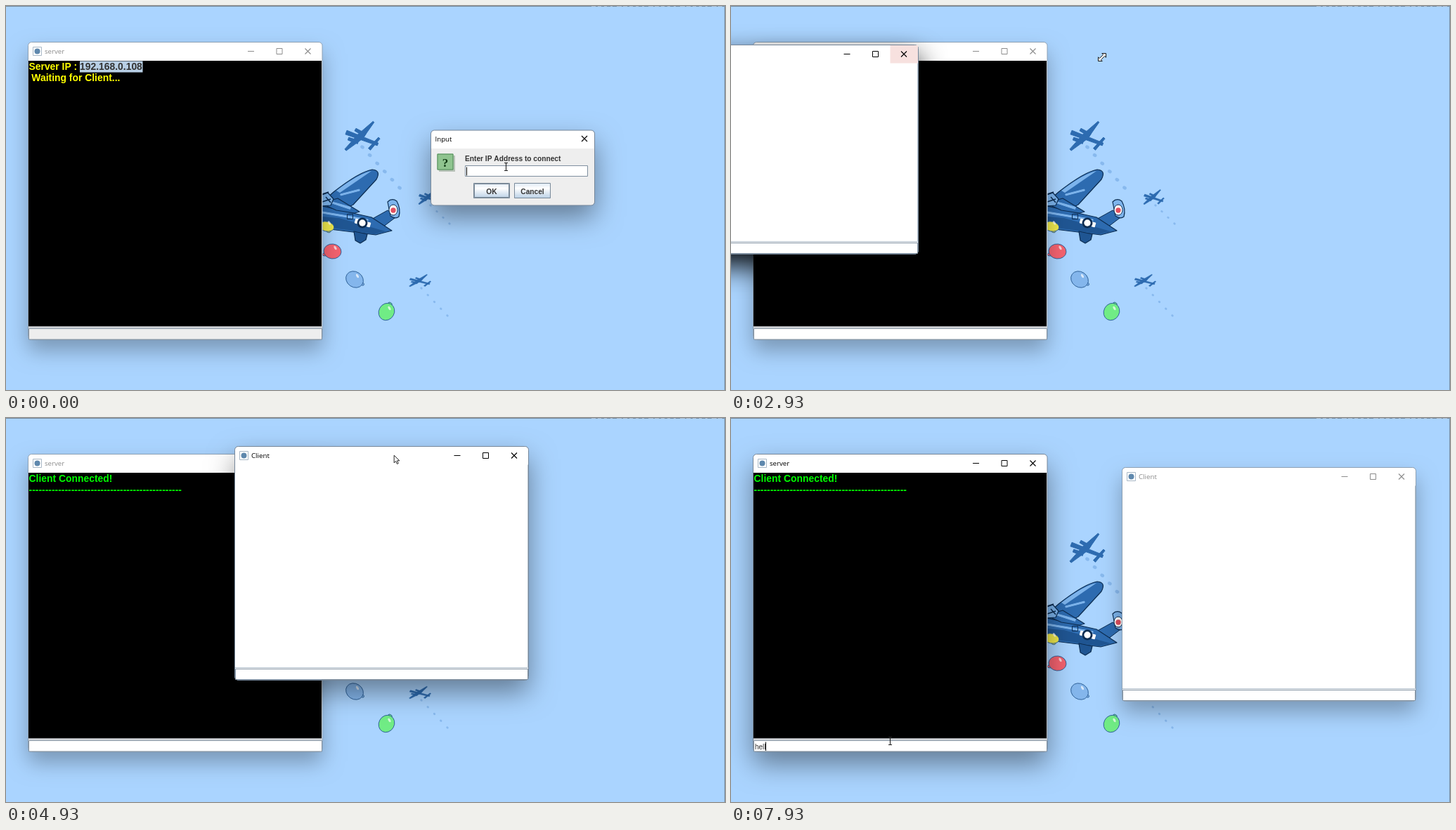
Recreate the animation shown at these times as an HTML page with a canvas. Size 1023 px wide and 547 px high, loop 8 s.

```html
<!DOCTYPE html>
<html lang="en">
<head>
<meta charset="utf-8">
<title>Server and client</title>
<style>
html, body { margin: 0; width: 100%; height: 100%; overflow: hidden; background: #aad4ff; }
canvas { display: block; }
</style>
</head>
<body>
<canvas id="stage" width="1023" height="547"></canvas>
<script>
const c = document.getElementById('stage').getContext('2d');
const LOOP = 8000, STEP = 136.7; // the screen refreshes once per step
const SANS = '"Liberation Sans", Arial, sans-serif';
const LABEL = 'bold 10.2px ' + SANS, FIELD = '10px ' + SANS, LOG = 'bold 13.9px ' + SANS;
const TITLE = '9.7px "Open Sans", "Noto Sans", sans-serif';
const BLUE = '#2d6bb0', DEEP = '#1f5592', NAVY = '#0c2d52', PALE = '#7db4ec';
const ADDRESS = '192.168.0.108';

const CONNECT = 1500, OPEN = 1900, DRAG = 4650, DROP = 5320, FOCUS = 6470;
// pointer moves: begin, end, and the place reached
const MOVES = [
  [400, 1000, 688, 261],
  [1700, 2380, 48, 19],
  [2600, 2860, 528, 73],
  [3000, 3500, 285, 20],
  [3900, 4300, 109, 32],
  [DRAG, DROP, 774, 83],
  [5500, FOCUS, 226.5, 460]
];

const part = (t, a, b) => Math.min(1, Math.max(0, (t - a) / (b - a)));
const mix = (a, b, k) => a + (b - a) * k;
// hand motion: quick sideways start, steady up and down
const glide = (x, y, tx, ty, k) => [mix(x, tx, k ** .45), mix(y, ty, k)];

function rect(x, y, w, h, fill) { c.fillStyle = fill; c.fillRect(x, y, w, h); }

function box(x, y, w, h, stroke) {
  c.strokeStyle = stroke;
  c.lineWidth = 1;
  c.strokeRect(x, y, w, h);
}

function text(s, x, y, font, fill, align = 'left') {
  c.font = font;
  c.fillStyle = fill;
  c.textAlign = align;
  c.fillText(s, x, y);
}

function shape(d, fill, stroke, width = 1) {
  const p = new Path2D(d);
  if (fill) { c.fillStyle = fill; c.fill(p); }
  if (stroke) { c.strokeStyle = stroke; c.lineWidth = width; c.stroke(p); }
}

function oval(x, y, rx, ry, fill, stroke, turn = 0) {
  c.beginPath();
  c.ellipse(x, y, rx, ry, turn, 0, 7);
  c.fillStyle = fill;
  c.fill();
  if (stroke) { c.strokeStyle = stroke; c.lineWidth = 1; c.stroke(); }
}

// tapered bar from one end width to the other
function blade(x1, y1, w1, x2, y2, w2, fill) {
  const a = Math.atan2(y2 - y1, x2 - x1), nx = -Math.sin(a) / 2, ny = Math.cos(a) / 2;
  c.lineJoin = 'round';
  shape(`M${x1 + nx * w1} ${y1 + ny * w1}L${x2 + nx * w2} ${y2 + ny * w2}
    ${x2 - nx * w2} ${y2 - ny * w2} ${x1 - nx * w1} ${y1 - ny * w1}Z`, fill, fill);
}

function smallPlane(x, y, sx, sy) {
  c.save();
  c.translate(x, y);
  c.scale(sx, sy);
  blade(17, -20, 2, -2, 1, 9, BLUE);
  blade(-2, 1, 9, -23, 20, 3, BLUE);
  blade(-22, -5, 6, 23, 12, 4, BLUE);
  blade(25, 3, 3, 11, 19, 4, BLUE);
  blade(-9, -9, 4, 5, -1, 5, BLUE);
  blade(-19, 4, 4, -5, 9, 5, BLUE);
  c.restore();
}

function trail(x, y, tx, ty, n, r) {
  for (let i = 0; i < n; i++) oval(mix(x, tx, i / (n - 1)), mix(y, ty, i / (n - 1)), r, r * .8, '#88b9ee', null, .6);
}

function balloon(x, y, rx, ry, turn, fill, knot) {
  oval(x + rx * Math.cos(knot), y + ry * Math.sin(knot), 3, 2, fill, '#2f6299', turn);
  oval(x, y, rx, ry, fill, '#2f6299', turn);
  oval(x + 4, y - 5, 1.6, 3, '#ffffffb0', null, -.5);
}

function bomber() {
  shape('M445 284L466 265Q503 236 521 233 534 234 527 247L494 283 478 291Z', BLUE, NAVY, 1.2);
  shape('M470 263Q503 238 520 235L475 266Z', PALE);
  blade(476, 269, 2, 503, 262, 2, PALE);
  shape('M516 306L543 291 557 299 536 315Z', BLUE, NAVY);
  shape('M445 284L520 301 549 320 526 326 445 316Z', BLUE, NAVY, 1.2);
  shape('M450 300L474 302 540 321 524 325 450 314Z', DEEP);
  blade(450, 294, 2, 515, 305, 2, PALE);
  shape('M543 279Q549 273 556 278 562 289 559 300 554 304 547 299Z', PALE, NAVY, 1.2);
  oval(551, 290.5, 6, 7.5, '#fff', NAVY);
  oval(551, 291, 3.7, 3.7, '#e2505f');
  shape('M448 281L472 274 503 293 496 295 470 291Z', BLUE, NAVY, 1.2);
  blade(464, 280, 2, 490, 288, 3, PALE);
  shape('M447 270L458 266 466 275 462 284 448 285Z', PALE, NAVY, 1.2);
  shape('M450 268L459 265M455 272L462 280M450 279L462 275', null, NAVY, 1.5);
  box(485.5, 296.5, 8, 7, NAVY);
  shape('M495 321L514 325 512 333 504 338 497 334Z', DEEP, NAVY, 1.2);
  blade(497, 306, 6, 518, 312, 6, '#fff');
  oval(507, 309, 7.5, 7.5, NAVY);
  oval(507, 309, 4.7, 4.7, '#fff');
}

function wallpaper() {
  rect(0, 0, 1023, 547, '#aad4ff');
  smallPlane(506, 185, 1, 1);
  smallPlane(601, 272, .59, .51);
  smallPlane(588.5, 391, .62, .42);
  trail(507, 201, 560, 259, 6, 3);
  trail(604, 284, 631, 310, 4, 1.8);
  trail(591, 402, 628, 441, 5, 1.8);
  bomber();
  balloon(456, 314, 11, 7, .2, '#eee84c', 1.3);
  balloon(464.5, 349.5, 12.5, 10.5, .1, '#f4626f', 2.7);
  balloon(496, 389.5, 13, 11, .6, '#84b6ec', .6);
  balloon(541.5, 435.5, 11, 12.5, .5, '#70ec85', -1.1);
  rect(0, 0, 1023, 1, '#74889c');
  rect(1022, 0, 1, 547, '#7b94ae');
  for (let x = 833; x < 1015; x += 9) rect(x, 0, 3 + x % 5, 1, '#a9b6c4');
}

function frame(x, y, w, h, active, body, depth = active ? .42 : .29) {
  const outline = new Path2D(), outside = new Path2D();
  outline.roundRect(x, y, w, h, 5);
  outside.rect(-500, -500, 2000, 2000);
  outside.addPath(outline);
  c.save();
  c.clip(outside, 'evenodd');
  c.shadowColor = `rgba(0,0,0,${depth})`;
  c.shadowBlur = active ? 38 : 30;
  c.shadowOffsetY = active ? 17 : 15;
  c.fill(outline);
  c.restore();
  const g = c.createLinearGradient(0, y, 0, y + h), cut = 26 / h;
  g.addColorStop(cut, '#fff');
  g.addColorStop(cut, body);
  c.fillStyle = g;
  c.fill(outline);
  c.strokeStyle = active ? '#76879a' : '#8da1b5';
  c.lineWidth = 1;
  c.stroke(outline);
}

function cross(x, y, ink) { shape(`M${x - 4} ${y - 4}l8 8m0 -8l-8 8`, null, ink, 1.1); }

function appWindow(title, x, y, w, h, active, hover, depth) {
  frame(x, y, w, h, active, '#fff', depth);
  const r = x + w, ink = active ? '#000' : '#8c8c8c';
  if (hover) rect(r - 40, y + .5, 39.5, 25.5, '#f7e1df');
  box(x + 7, y + 7, 12, 12, '#a9b8c6');
  oval(x + 13, y + 13, 4, 4, '#5f88ad');
  text(title, x + 23.5, y + 16.7, TITLE, ink);
  shape(`M${r - 106} ${y + 13}h9`, null, ink);
  box(r - 65, y + 9, 8, 8, ink);
  cross(r - 20.5, y + 13, ink);
}

function inputField(x, y, w, h, value, fill, caret) {
  rect(x, y, w, h, fill);
  box(x, y, w, h, '#7f8f9f');
  text(value, x + 1.5, y + h - 3.5, FIELD, '#333');
  if (caret) rect(Math.round(x + 1 + c.measureText(value).width), y + 2, 1, h - 3, '#000');
}

function server(t) {
  const linked = t >= CONNECT, focused = t >= FOCUS;
  appWindow('server', 31.5, 51.5, 418.5, 424, focused || linked && t < OPEN);
  rect(32, 78, 417, 378.5, '#000');
  rect(32, 456.5, 417, 2, '#c2c6cb');
  if (linked) {
    text('Client Connected!', 32.5, 91, LOG, '#0f0');
    text('-'.repeat(47), 32.5, 107, LOG, '#0f0');
  } else {
    rect(105, 78.5, 89.5, 16, '#b8cfe5');
    text('Server IP : ', 32.5, 91, LOG, '#ff0');
    text(ADDRESS, 105, 91, LOG, '#333');
    text(' Waiting for Client...', 32.5, 107, LOG, '#ff0');
  }
  // three quick keys, then a pause before the last
  const keys = t > 7900 ? 4 : Math.min(3, Math.max(0, Math.ceil((t - 7190) / STEP)));
  inputField(32.5, 459.5, 417, 15.5, 'hell'.slice(0, keys), linked ? '#fff' : '#eee', t > FOCUS + 200);
}

function button(label, x, pressed) {
  const g = c.createLinearGradient(0, 252, 0, 274);
  g.addColorStop(0, '#dce8f3');
  g.addColorStop(.35, '#fff');
  g.addColorStop(1, '#b8cfe5');
  rect(x, 252, 52, 22, pressed ? '#a9c4e0' : g);
  box(x + .5, 252.5, 51, 21, '#7a8a99');
  if (label === 'OK') box(x + 1.5, 253.5, 49, 19, '#7a8a99');
  text(label, x + 26, 267.8, LABEL, '#333', 'center');
}

function dialog(t) {
  const gone = part(t, CONNECT, CONNECT + 240);
  if (gone === 1) return;
  c.save();
  c.globalAlpha = 1 - gone;
  c.translate(720.5 - 3.5 * gone, 230.5 - 1.5 * gone);
  c.scale(1 - .06 * gone, 1 - .06 * gone);
  c.translate(-720.5, -230.5);
  frame(604.5, 177, 233, 107, true, '#eee');
  text('Input', 610.5, 193, TITLE, '#000');
  if (!gone) cross(823, 189, '#000');
  rect(616, 213, 23, 23, '#b9c2b9');
  rect(613.5, 210.5, 23, 23, '#8fc48f');
  box(614, 211, 22, 22, '#4f8a57');
  text('?', 625, 228.5, 'bold 17px "Liberation Serif", serif', '#0b350f', 'center');
  text('Enter IP Address to connect', 653, 221.3, LABEL, '#333');
  inputField(653.5, 227.5, 174, 15, t >= 400 ? ADDRESS : '', '#fff', t < 1100);
  button('OK', 665, t >= 1200);
  button('Cancel', 723);
  c.restore();
}

function client(t) {
  if (t < OPEN) return;
  const grown = part(t, 3000, 3500);
  const [gx, gy] = glide(-133, mix(56, 20, grown), 557, 71, part(t, DRAG, DROP));
  const x = Math.round(gx) - .5, y = Math.round(gy) - .5;
  const w = mix(400, 418, grown), h = mix(298, 333, grown), b = y + h;
  const opening = grown < 1;
  appWindow('Client', x, y, w, h, t < FOCUS, t > 2700 && t < 3000, opening ? .95 : undefined);
  shape(`M${x + .5} ${b - 18}H${x + w - 1}V${y + 26}`, null, '#b3c0cc');
  inputField(x + 1, b - 16, w - 2, 15, '', '#fff');
}

function pointer(t) {
  let x = 711.5, y = 229;
  for (const [a, b, tx, ty] of MOVES) [x, y] = glide(x, y, tx, ty, part(t, a, b));
  c.save();
  c.translate(x, y);
  if (t < 690 || t >= FOCUS) {
    shape('M-2.5 -5.5H2.5M0 -5V5M-2.5 5.5H2.5', null, '#222', 1.1);
  } else if (t >= 2860 && t < 3600) {
    shape('M5.5 -5.5V.2L3.7 -1.6 -1.6 3.7 .2 5.5H-5.5V-.2L-3.7 1.6 1.6 -3.7 -.2 -5.5Z', '#fff', '#000', .9);
  } else {
    shape('M.5 .5V11.2L3 8.9 4.8 12.8 6.6 12 4.8 8.2H8.2Z', '#fff', '#111', .9);
  }
  c.restore();
}

function draw(now) {
  const t = Math.floor(now % LOOP / STEP) * STEP;
  wallpaper();
  server(t);
  dialog(t);
  client(t);
  pointer(t);
}

const start = performance.now();
(function tick() {
  draw(performance.now() - start);
  requestAnimationFrame(tick);
})();
</script>
</body>
</html>
```
